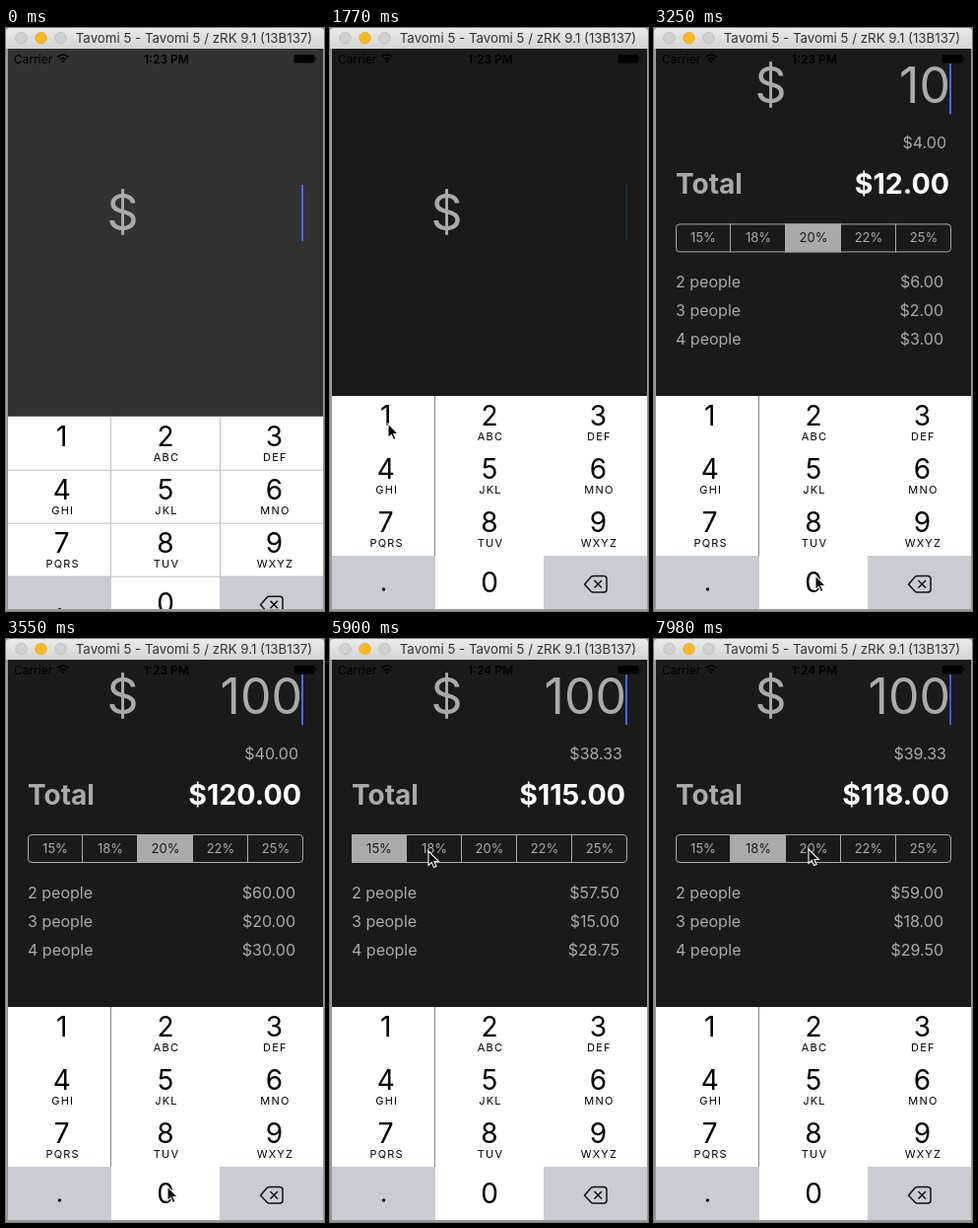
Recreate the animation shown at these times as an HTML page. Size 323x591 px, loop 8000 ms.

```html
<!DOCTYPE html>
<html lang="en">
<head>
<meta charset="utf-8">
<title>Tip calculator</title>
<style>
html, body { margin: 0; width: 100%; height: 100%; overflow: hidden; background: #999; }
svg { display: block; width: 323px; height: 591px; font-family: Inter, Roboto, "Liberation Sans", sans-serif; }
text { white-space: pre; }
.mid { text-anchor: middle; }
.end { text-anchor: end; }
.big { font-size: 50px; fill: #aaa; }
.row { font-size: 16px; fill: #aaa; }
.total { font-size: 28px; font-weight: 700; fill: #aaa; }
.sum { font-size: 28.6px; fill: #fff; }
.seg { font-size: 13px; fill: #aaa; }
.digit { font-size: 28px; }
.abc { font-size: 11px; letter-spacing: 1.2px; }
</style>
</head>
<body>
<svg viewBox="0 0 323 591">
  <defs>
    <linearGradient id="bar" x2="0" y2="1">
      <stop stop-color="#ebebeb"/><stop offset="1" stop-color="#d3d3d3"/>
    </linearGradient>
    <clipPath id="screen"><path d="M2 21H322V589H2z"/></clipPath>
    <clipPath id="belowStatus"><path d="M2 36H322V589H2z"/></clipPath>
  </defs>
  <path d="M0 21V4q0-4 4-4H319q4 0 4 4V21z" fill="url(#bar)"/>
  <g stroke-width=".6">
    <circle cx="15.500" cy="10" r="5.800" fill="#d0d0d0" stroke="#b5b5b5"/>
    <circle cx="35.500" cy="10" r="5.800" fill="#fdb924" stroke="#dfa023"/>
    <circle cx="55.500" cy="10" r="5.800" fill="#d0d0d0" stroke="#b5b5b5"/>
  </g>
  <text class="mid" x="191" y="15" font-size="13.300" fill="#333">Tavomi 5 - Tavomi 5 / zRK 9.1 (13B137)</text>

  <g clip-path="url(#screen)">
    <rect id="bg" x="2" y="21" width="320" height="568"/>
    <g font-size="12">
      <text x="8" y="35.500">Carrier</text>
      <text id="clock" class="mid" x="163" y="35.500" font-weight="600"></text>
      <path d="M52.500 29.500q5.500-5 11 0M54.700 32q3.300-3 6.600 0" fill="none" stroke="#000" stroke-width="1.600"/>
      <path d="M56 33.500q2-1.500 4 0l-2 2z"/>
      <rect x="292.500" y="27" width="21" height="8.500" rx="1.500"/>
      <path d="M314.500 29.500q2 1.700 0 3.500z"/>
    </g>
    <g id="amountRow">
      <text class="big mid" x="118.500" y="205">$</text>
      <text id="amount" class="big end" x="301" y="205"></text>
    </g>
    <g clip-path="url(#belowStatus)"><rect id="caret" x="300" width="2" height="57" fill="#4469f0"/></g>
    <g id="details">
      <text id="tip" class="row end" x="297" y="122"></text>
      <text class="total" x="22" y="168">Total</text>
      <text id="total" class="total sum end" x="300" y="168"></text>
      <rect id="chosen" y="198" width="56" height="29" fill="#aaa"/>
      <path d="M77.500 198v29m56-29v29m56-29v29m56-29v29" stroke="#aaa"/>
      <rect x="22.500" y="198.500" width="279" height="28" rx="3.500" fill="none" stroke="#aaa"/>
      <g id="segments"></g>
      <g id="people"></g>
    </g>
    <g id="pad"></g>
  </g>
  <path id="pointer" d="M0 0V14.500L3.300 11.400 5.500 16.600 8 15.500 5.800 10.500H10.400z" stroke="#fff" stroke-width="1.100"/>
</svg>
<script>
const $ = id => document.getElementById(id);
const rates = [15, 18, 20, 22, 25], columns = [56.7, 162, 272.4];
const letters = ['', 'ABC', 'DEF', 'GHI', 'JKL', 'MNO', 'PQRS', 'TUV', 'WXYZ'];

// Each entry: time, then values
const pointerPath = [[1470, -20, 500], [1620, 23, 460], [1770, 59, 401], [2560, 59, 401],
  [2810, 131, 524], [3110, 164, 555], [3850, 164, 555], [4000, 168, 567], [4200, 158, 510],
  [4700, 62, 235], [4900, 42, 214], [5450, 44, 214], [5850, 100, 215], [6650, 100, 215],
  [7450, 157, 213]];
const firstBlinks = [[850, 1], [1020, 0], [1320, 0], [1480, 1], [1600, 1], [1790, .06], [1900, 0], [2060, 1]];
const blink = [[0, 1], [180, 0], [490, 0], [680, 1]];

$('segments').innerHTML = rates.map((r, i) =>
  `<text class="seg mid" x="${50 + 56 * i}" y="217">${r}%</text>`).join('');
$('people').innerHTML = [2, 3, 4].map((n, i) =>
  `<text class="row" x="22" y="${263 + 29 * i}">${n} people</text>
   <text class="row end share" x="294" y="${263 + 29 * i}"></text>`).join('');
$('pad').innerHTML = `<path d="M2 373H322V590H2z" fill="#fff"/>
  <rect id="key1" x="2" y="373" width="104" height="54" fill="#c9ccd3"/>
  <path d="M2 535H107V640H2zM217 535H322V640H217z" fill="#c9ccd3"/>
  <path id="rules" d="M2 427.500H322M2 481.500H322M2 535.500H322M217.500 373V535" stroke="#c4c4c6"/>
  <path id="edge" d="M106.500 373V535"/>` +
  letters.map((s, i) => {
    const x = columns[i % 3], y = 403 + 54 * Math.floor(i / 3);
    return `<text class="digit mid" x="${x}" y="${y}">${i + 1}</text>
      <text class="abc mid" x="${x + 1}" y="${y + 15}">${s}</text>`;
  }).join('') +
  `<text class="digit mid" x="162" y="572">0</text>
   <circle cx="54.500" cy="569" r="1.700"/>
   <path d="M258.500 564L265 556.500Q266 555.500 267.500 555.500H278q3 0 3 3V569q0 3-3 3H267.500Q266 572 265 571zM268.500 560l7.500 7.500m0-7.500l-7.500 7.500" fill="none" stroke="#111" stroke-width="1.500" stroke-linejoin="round"/>`;
const shares = document.querySelectorAll('.share');

function track(keys, t) {
  const n = keys.findIndex(k => k[0] > t);
  if (n === 0) return keys[0].slice(1);
  if (n < 0) return keys[keys.length - 1].slice(1);
  const a = keys[n - 1], b = keys[n], p = (t - a[0]) / (b[0] - a[0]);
  return a.slice(1).map((v, i) => v + (b[i + 1] - v) * p);
}
const money = v => '$' + v.toFixed(2);
const setText = (el, s) => { if (el.textContent !== s) el.textContent = s; };
const move = (el, x, y) => el.setAttribute('transform', `translate(${x} ${y})`);

function draw(t) {
  const shade = Math.round(26 + 25 * Math.exp(-t / 35));
  $('bg').setAttribute('fill', `rgb(${shade},${shade},${shade})`);
  move($('pad'), 0, 21 * Math.exp(-t / 70));
  $('rules').style.opacity = t < 590 ? 1 : 0;
  $('edge').setAttribute('stroke', t < 590 ? '#c4c4c6' : '#888');
  $('key1').style.opacity = t >= 2360 && t < 2510 ? 1 : 0;

  const bill = t < 2510 ? 0 : t < 3240 ? 1 : t < 3540 ? 10 : 100;
  const choice = t < 5160 ? 2 : t < 6480 ? 0 : 1;
  const rate = rates[choice] / 100, sum = bill * (1 + rate);
  setText($('amount'), bill ? String(bill) : '');
  setText($('tip'), money(sum / 3));
  setText($('total'), money(sum));
  [sum / 2, bill * rate, sum / 4].forEach((v, i) => setText(shares[i], money(v)));
  setText($('clock'), t < 4420 ? '1:23 PM' : '1:24 PM');
  $('chosen').setAttribute('x', 22 + 56 * choice);
  [...$('segments').children].forEach((el, i) => el.style.fill = i === choice ? '#1a1a1a' : '#aaa');

  const p = Math.min(1, Math.max(0, (t - 2670) / 600));
  const rise = p < .5 ? 2 * p * p : 1 - 2 * (1 - p) ** 2;
  move($('amountRow'), 0, -129 * rise);
  move($('details'), 0, 206 * (1 - rise));
  $('details').style.opacity = rise;
  $('caret').setAttribute('y', 159 - 129 * rise);
  $('caret').style.opacity = t < 3950 ? track(firstBlinks, t)[0] : track(blink, (t - 3950) % 1000)[0];

  move($('pointer'), ...track(pointerPath, t));
}

const start = performance.now();
function tick() {
  draw((performance.now() - start) % 8000);
  requestAnimationFrame(tick);
}
tick();
</script>
</body>
</html>
```
